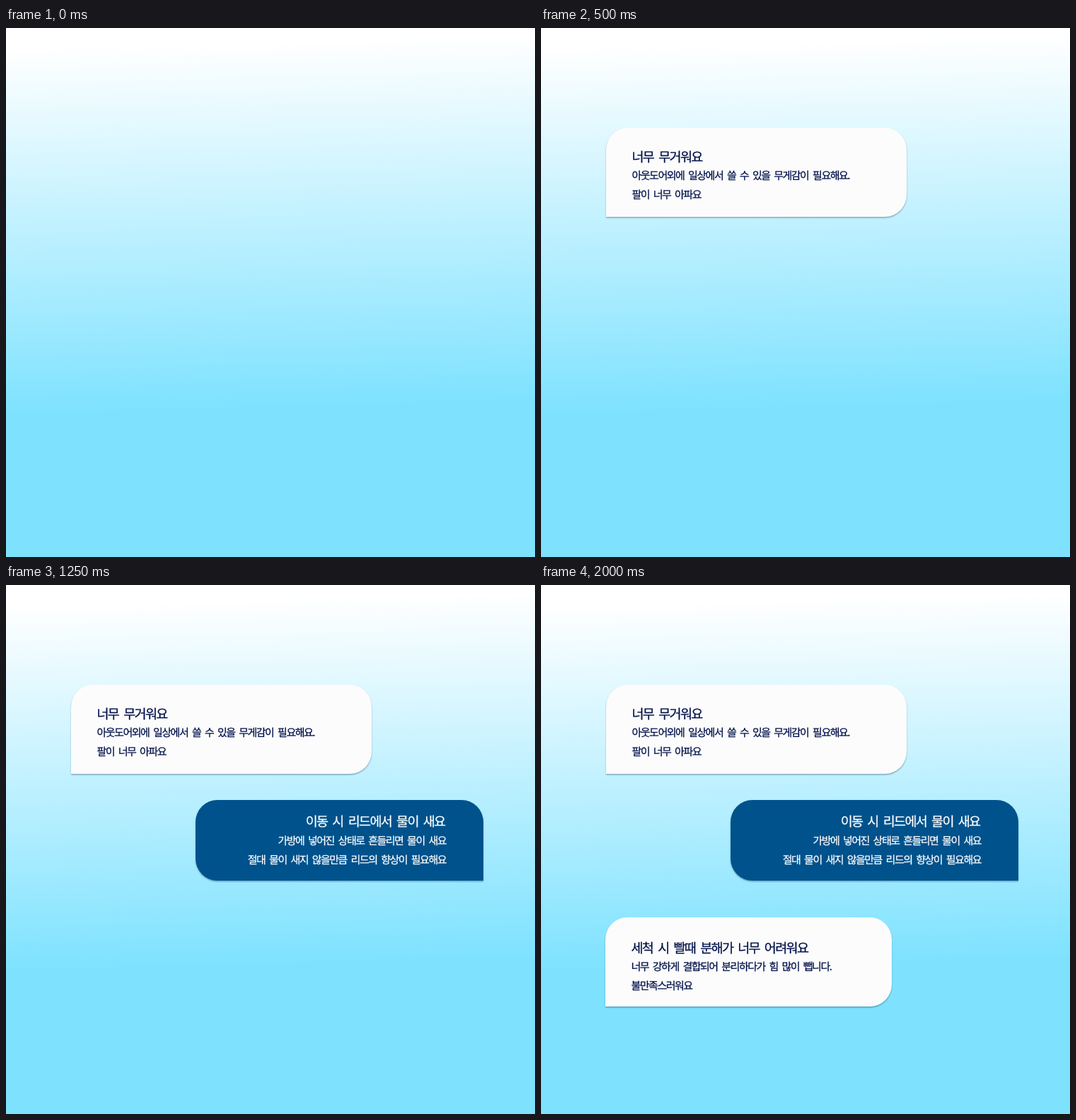
These frames come from a looping animation (748 by 748 pixels, 3700 ms). An HTML page:

```html
<!DOCTYPE html>
<html lang="ko">
<head>
<meta charset="utf-8">
<title>사용자 의견</title>
<style>
@property --p { syntax: "<number>"; inherits: false; initial-value: 0; }

html, body { margin: 0; width: 100%; height: 100%; overflow: hidden; }

body {
  position: relative;
  background: linear-gradient(178.5deg, #fff 30px, #7ee2ff 546px);
  font-family: "Noto Sans CJK KR", "Noto Sans CJK", "Noto Sans KR", sans-serif;
  text-rendering: geometricPrecision;
}

.bubble {
  position: absolute;
  background: #fcfcfc;
  color: #00114a;
  border-radius: 31px 31px 31px 0;
  box-shadow: 0 1.5px 2px rgba(0, 40, 70, .36);
  opacity: calc(2 * var(--p));
  transform: translateY(calc((1 - var(--p)) * var(--rise)));
  animation: 3700ms infinite;
}

.bubble > * {
  position: absolute;
  left: 37px;
  margin: 0;
  white-space: nowrap;
  font-weight: 500;
  line-height: 28px;
  -webkit-text-stroke: .25px;
}

h2 { font-size: 18.5px; letter-spacing: -1.65px; word-spacing: 3.4px; }
p { font-size: 15px; letter-spacing: -1.5px; word-spacing: 3px; }

.weight { left: 91.5px; top: 141px; width: 425px; height: 126px; --rise: 164px; animation-name: weight; }
.weight h2 { top: 27px; }
.weight p { top: 53.5px; }
.weight p + p { top: 80.5px; }

.leak {
  left: 268px; top: 303.5px; width: 407px; height: 114px; --rise: 165px;
  background: #00528c;
  color: #fff;
  border-radius: 31px 31px 0 31px;
  animation-name: leak;
}
.leak > * { left: auto; right: 53px; }
.leak h2 { top: 16.5px; right: 54.5px; }
.leak p { top: 44px; }
.leak p + p { top: 71px; }

.wash { left: 90.5px; top: 470px; width: 405px; height: 126px; --rise: 151.25px; animation-name: wash; }
.wash h2 { top: 28.5px; }
.wash p { top: 55.5px; }
.wash p + p { top: 83px; }

/* Each bubble climbs in 50 ms steps and is opaque halfway up. */
@keyframes weight {
  0% { --p: 0; animation-timing-function: steps(10); }
  13.51%, 100% { --p: 1; }
}
@keyframes leak {
  0%, 20.267% { --p: 0; animation-timing-function: steps(10); }
  33.78%, 100% { --p: 1; }
}
@keyframes wash {
  0%, 39.186% { --p: 0; animation-timing-function: steps(11); }
  54.05%, 100% { --p: 1; }
}
</style>
</head>
<body>
<section class="bubble weight">
  <h2>너무 무거워요</h2>
  <p>아웃도어외에 일상에서 쓸 수 있을 무게감이 필요해요.</p>
  <p>팔이 너무 아파요</p>
</section>
<section class="bubble leak">
  <h2>이동 시 리드에서 물이 새요</h2>
  <p>가방에 넣어진 상태로 흔들리면 물이 새요</p>
  <p>절대 물이 새지 않을만큼 리드의 향상이 필요해요</p>
</section>
<section class="bubble wash">
  <h2>세척 시 빨때 분해가 너무 어려워요</h2>
  <p>너무 강하게 결합되어 분리하다가 힘 많이 뺍니다.</p>
  <p>불만족스러워요</p>
</section>
</body>
</html>
```
